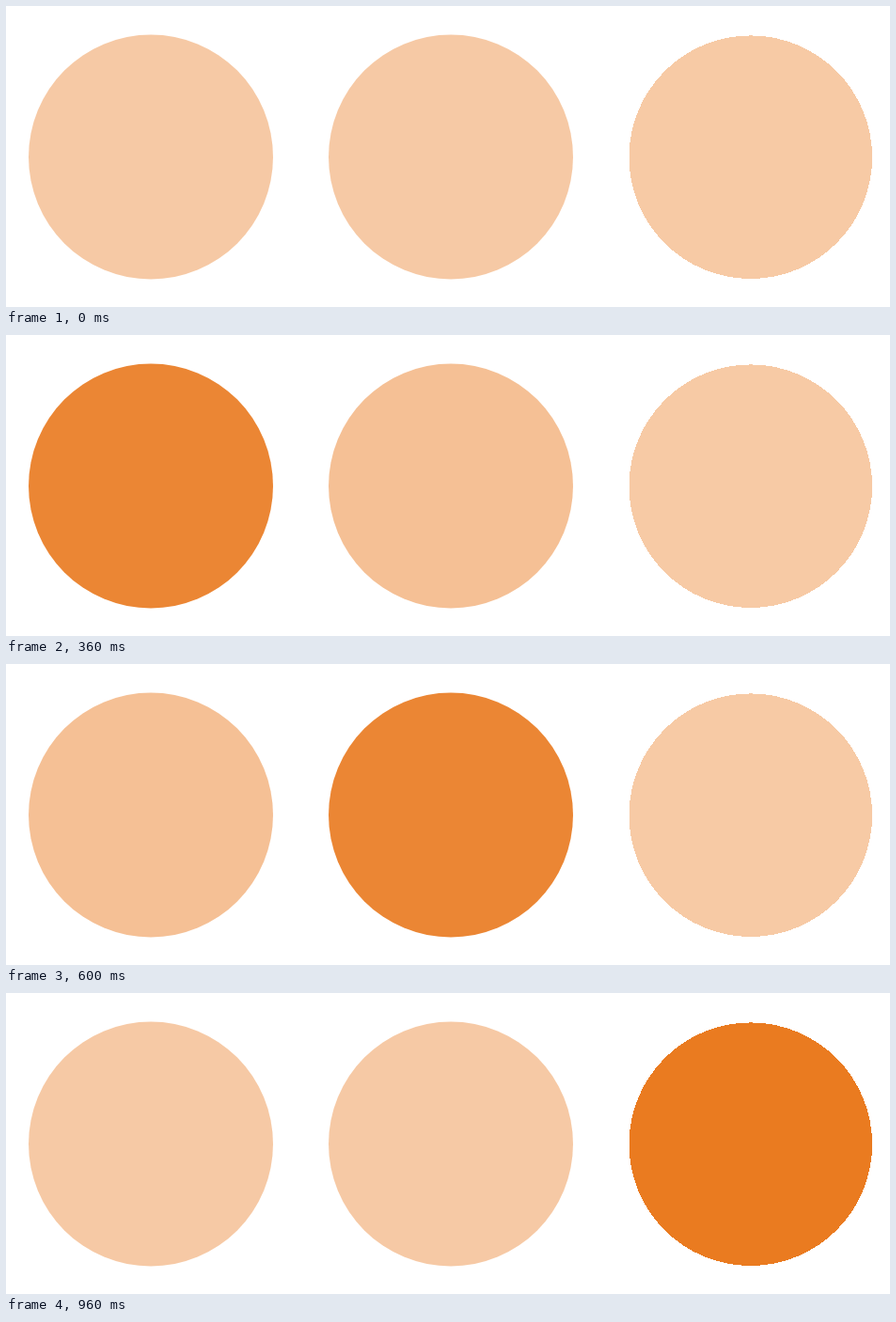
Write an HTML page that moves like this. It is 940x320 px and loops after 1.36 s.

```html
<!DOCTYPE html>
<html lang="en">
<head>
<meta charset="utf-8">
<title>Three pulsing dots</title>
<style>
  html, body {
    margin: 0;
    width: 100%;
    height: 100%;
    overflow: hidden;
    background: #fff;
  }
  svg {
    display: block;
    width: 940px;
    height: 320px;
  }
  circle {
    fill: #ea7b20;
    opacity: .4;
    animation: pulse 1360ms infinite;
  }
  .second { animation-delay: 320ms; }
  .third { animation-name: rise; }

  /* brightness moves in 40 ms steps */
  @keyframes pulse {
    0% { opacity: .4; animation-timing-function: steps(7); }
    20.58% { opacity: .9133; animation-timing-function: step-end; }
    23.52% { opacity: 1; animation-timing-function: step-end; }
    26.47% { opacity: .9133; animation-timing-function: steps(7); }
    47.05%, 100% { opacity: .4; }
  }
  /* the last dot stays lit until the loop restarts */
  @keyframes rise {
    0% { opacity: .4; }
    47.05% { opacity: .4; animation-timing-function: steps(7); }
    67.64% { opacity: .9133; animation-timing-function: step-end; }
    70.58%, 100% { opacity: 1; }
  }
</style>
</head>
<body>
<svg viewBox="0 0 940 320">
  <circle cx="154" cy="160.5" r="130"/>
  <circle class="second" cx="473" cy="160.5" r="130"/>
  <circle class="third" cx="791.8" cy="160.7" r="129.3" shape-rendering="crispEdges"/>
</svg>
</body>
</html>
```
